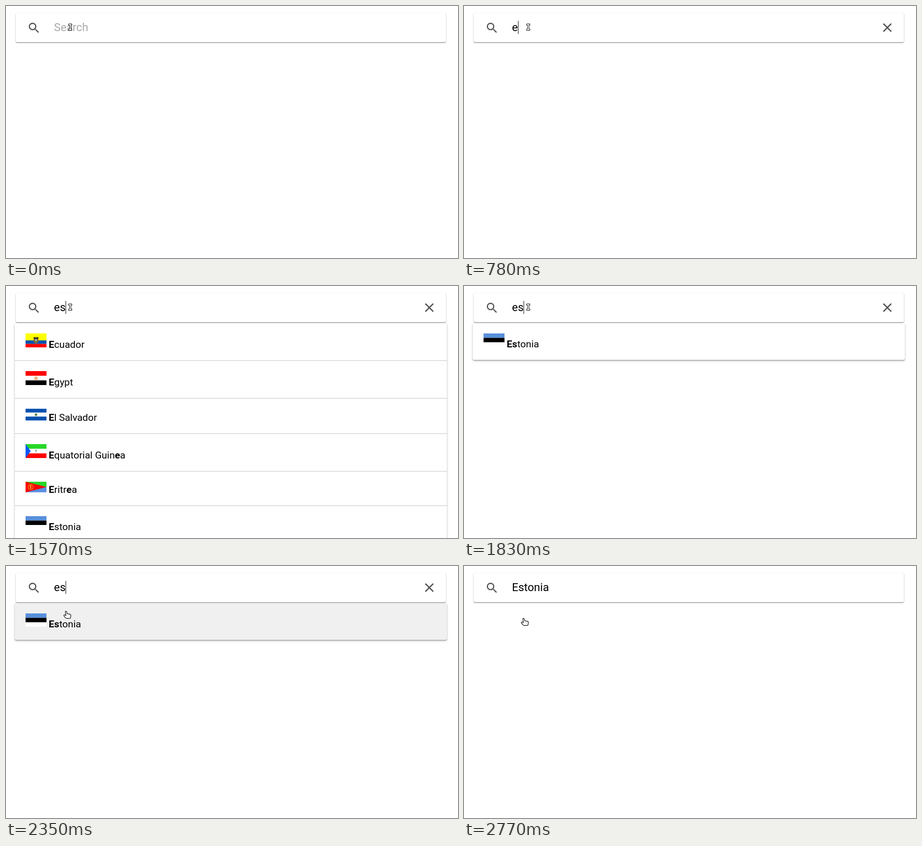
Write an HTML page that moves like this. It is 971 by 542 pixels and loops after 2.81 s.

```html
<!DOCTYPE html>
<html lang="en">
<head>
<meta charset="utf-8">
<title>Country search</title>
<style>
  html, body { margin: 0; width: 100%; height: 100%; overflow: hidden; background: #fff; }
  #stage { position: relative; width: 971px; height: 542px; max-height: 100%; overflow: hidden; }
  #bar, #list, #art { position: absolute; }
  #bar { left: 21px; top: 15px; width: 924px; height: 63px; border-radius: 3px; background: #fff;
    box-shadow: 0 1px 1px rgba(0,0,0,.42), 0 1px 3px rgba(0,0,0,.24); }
  #list { left: 19px; top: 80px; width: 928px; border-radius: 0 0 3px 3px; clip-path: inset(0 -8px -8px);
    box-shadow: 0 1px 1px rgba(0,0,0,.32), 0 2px 4px rgba(0,0,0,.26); }
  #art { display: block; left: 0; top: 0; }
  text { font-family: Roboto, sans-serif; font-size: 21px; white-space: pre; }
  #query { font-size: 24px; }
  .b { font-weight: 700; }
</style>
</head>
<body>
<div id="stage">
<div id="list"></div>
<div id="bar"></div>
<svg id="art" width="971" height="542" viewBox="0 0 971 542">
  <path fill="#525252" transform="translate(45.2 32.2) scale(1.25)" d="M15.5 14h-.79l-.28-.27A6.47 6.47 0 0 0 16 9.5 6.5 6.5 0 1 0 9.5 16c1.61 0 3.09-.59 4.23-1.57l.27.28v.79l5 4.99L20.49 19zM9.5 14a4.5 4.5 0 1 1 0-9 4.5 4.5 0 0 1 0 9z"/>
  <path id="clear" fill="#525252" transform="translate(893.2 30.3) scale(1.35)" d="M19 6.41 17.59 5 12 10.59 6.41 5 5 6.41 10.59 12 5 17.59 6.41 19 12 13.41 17.59 19 19 17.59 13.41 12z"/>
  <text id="query" x="103" y="54"></text>
  <rect id="caret" width="1" height="28"/>
  <g id="full"></g>
  <g id="single"></g>
  <path id="beam" fill="#fff" stroke="#000" d="M-3.5-7h7v3h-2v8h2v3h-7v-3h2v-8h-2z"/>
  <g id="hand" stroke="#000" stroke-linejoin="round">
    <path fill="#fff" stroke-width="1.2" d="M-1.4 1.8C-1 .2 1 .2 1.5 1.8L2.5 6l6.2 1.1q1.9.6 1.8 2.4l-.6 4.8q-.3 1.7-1.5 1.8H1q-1.6-.1-2.5-1.9l-2.9-3.5q-.7-1.3.7-2.1 1.2-.2 2.4.8l1.2.4z"/>
    <path fill="none" stroke="#999" stroke-width="1" stroke-dasharray="1 1.4" d="M1.4 10.6h7"/>
  </g>
</svg>
</div>
<script>
const $ = id => document.getElementById(id);
const rect = (x, y, w, h, fill) => `<rect x="${x}" y="${y}" width="${w}" height="${h}" fill="${fill}"/>`;
const path = (d, fill) => `<path d="${d}" fill="${fill}"/>`;
const dot = (x, y, r, fill) => `<circle cx="${x}" cy="${y}" r="${r}" fill="${fill}"/>`;
const bands = (h, ...fills) => fills.map((f, i) => rect(0, i * h, 45, h, f)).join('');

const flags = {
  ecuador: rect(0, 0, 45, 15, '#ff0') + rect(0, 15, 45, 7.5, '#0052b0') + rect(0, 22.5, 45, 7.5, '#f00')
    + path('M16.5 9l4-1.2 2 1.2 2-1.2 4 1.2-2 3h-8z', '#332d20')
    + path('M17 12h11l-1 7-4.5 3-4.5-3z', '#a06a28')
    + `<ellipse cx="22.5" cy="15.4" rx="2.8" ry="4" fill="#9fcbd4" stroke="#3d3a1c"/>`
    + rect(20.5, 16, 4, 2, '#58883c'),
  egypt: bands(10, '#f00', '#fff', '#000')
    + path('M19.5 11.5l2 1 1-1 1 1 2-1v6h1v1.2h-8v-1.2h1z', '#e59a62') + rect(21.6, 13.5, 1.8, 3, '#fff3e4'),
  salvador: bands(8.4, '#0052b0', '#fff', '#0052b0')
    + dot(22.5, 12.7, 2.9, '#7fa66c') + dot(22.5, 12.5, 1.5, '#4c5f40') + rect(19.5, 15, 6, .8, '#b8c98f'),
  guinea: bands(10, '#28d728', '#fff', '#f00') + path('M0 0l11 15L0 30z', '#0058ff')
    + rect(20, 12, 5, 5, '#d9e2dc') + dot(22.5, 13.5, 1.4, '#6eb38c') + rect(22.1, 14, .8, 3, '#8c8a70')
    + rect(19.5, 18, 6, .8, '#c5c5bd'),
  eritrea: rect(0, 0, 45, 11.3, '#28d728') + rect(0, 11.3, 45, 11.4, '#5b8ee0') + path('M0 0l45 11.3L0 22.7z', '#f00')
    + `<circle cx="11" cy="11.4" r="5.4" fill="none" stroke="#e8a020" stroke-width="1.3"/>`
    + rect(10.4, 7.5, 1.2, 8, '#f0b02a') + dot(11, 9.4, 1.8, '#f0b02a') + dot(11, 12.8, 1.5, '#f0b02a'),
  estonia: bands(9.5, '#588fdc', '#000', '#fff')
};

// Text between asterisks is bold.
const label = s => s.split('*').map((p, i) => `<tspan class="${i % 2 ? 'b' : ''}">${p}</tspan>`).join('');
const row = (flag, name, top, base) =>
  `<g transform="translate(42 ${top})">${flags[flag]}</g><text x="91.8" y="${base}">${label(name)}</text>`;

$('full').innerHTML = [
  ['ecuador', '*E*cuador', 102, 133],
  ['egypt', '*E*gypt', 183, 214],
  ['salvador', '*E*l Salvador', 264, 290],
  ['guinea', '*E*quatorial Guin*e*a', 340, 371],
  ['eritrea', '*E*ritr*e*a', 421, 445],
  ['estonia', '*E*stonia', 495, 525]
].map(r => row(...r)).join('') + [160, 241, 317, 398, 472].map(y => rect(19, y, 928, 1, '#c1c1c1')).join('');
$('single').innerHTML = row('estonia', '*Es*tonia', 102, 132);

const LOOP = 2810;
// Pointer hot spot: time, x, y
const moves = [[0, 138, 45.5], [2230, 137, 50.5], [2270, 135, 62.5], [2310, 131.5, 84],
  [2350, 128.8, 96.6], [2390, 128.2, 108], [2430, 127.8, 111.8]];
const typed = [[0, ''], [780, 'e'], [1570, 'es'], [2710, 'Estonia']];
const lists = [[0, ''], [1060, 'full'], [1830, 'single'], [2770, '']];
const at = (steps, t) => steps.filter(s => s[0] <= t).pop();
const show = (id, on) => { $(id).style.display = on ? '' : 'none'; };

function draw(t) {
  const text = at(typed, t)[1], list = at(lists, t)[1], [, x, y] = at(moves, t);
  const over = y > 80;
  $('query').textContent = text || 'Search';
  $('query').setAttribute('fill', text ? '#000' : '#aaa');
  show('clear', t >= 780 && t < 2710);
  show('caret', t >= 50 && t < 600 || t >= 780 && t < 2390);
  $('caret').setAttribute('x', { '': 103, e: 116 }[text] || 128);
  $('caret').setAttribute('y', text ? 32 : 33);
  show('full', list === 'full');
  show('single', list === 'single');
  show('list', list);
  $('list').style.height = list === 'full' ? '480px' : '79px';
  $('list').style.background = over ? '#f0f0f0' : '#fff';
  show('beam', !over);
  show('hand', over);
  $(over ? 'hand' : 'beam').setAttribute('transform', `translate(${x} ${y})`);
}

const start = performance.now();
(function tick() {
  draw((performance.now() - start) % LOOP);
  requestAnimationFrame(tick);
})();
</script>
</body>
</html>
```
